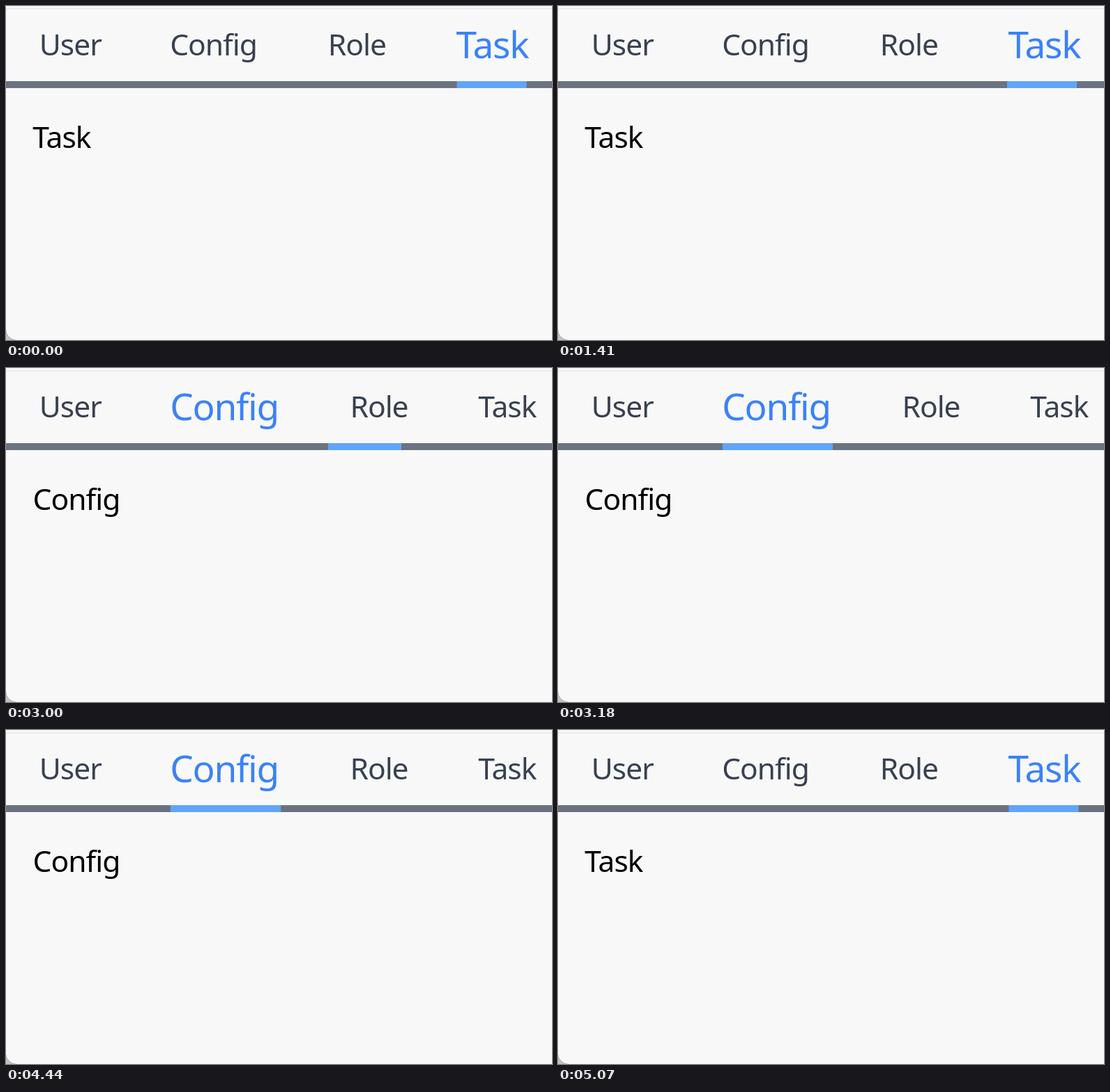
Recreate the animation shown at these times as an HTML page. Size 783 by 480 pixels, loop 5760 ms.

```html
<!DOCTYPE html>
<html lang="en">
<head>
<meta charset="utf-8">
<title>Tabs</title>
<style>
  html, body { margin: 0; width: 100%; height: 100%; overflow: hidden; background: #f8f8f8; }
  svg { display: block; width: 783px; height: 480px; }
  text { font: 42.5px "Noto Sans", "Open Sans", sans-serif; letter-spacing: -0.023em; }
  .tab { fill: #374151; }
  .tab.active { fill: #3b82f6; font-size: 53.1px; }
  .blank .tab { fill: #fffafd; stroke: #fffafd; stroke-width: 2px; }
  .blank #marker { visibility: hidden; }
</style>
</head>
<body>
<svg id="stage" viewBox="0 0 783 480">
  <rect width="783" height="480" fill="#c4c4c4"/>
  <rect x="-0.5" y="-40" width="830" height="520.5" rx="16" fill="#f8f8f8" stroke="#a4a4a4"/>
  <path d="M0 0V450" stroke="#f8f8f8" stroke-width="2"/>
  <path d="M20 480H783" stroke="#f8f8f8" stroke-width="2"/>
  <rect y="3.5" width="783" height="1.2" fill="#e3e3e3"/>
  <g id="tabs"></g>
  <rect y="108" width="783" height="10" fill="#6b7280"/>
  <rect id="marker" y="108" height="10" fill="#60a5fa"/>
  <text id="content" y="204"></text>
</svg>
<script>
const LOOP = 5760, STEP = 30, DURATION = 150;
const START = 49.3, GAP = 100, GROWTH = 1.25;

// width: advance at normal size; dx: side-bearing correction
const tabs = [
  { name: "User", width: 86.6, dx: -1.6 },
  { name: "Config", width: 126.6, dx: -0.7 },
  { name: "Role", width: 84, dx: -0.7 },
  { name: "Task", width: 80, dx: -1 }
];
const [USER, CONFIG, ROLE, TASK] = tabs.keys();

// lead: how far the marker's transition is along at the first repaint
const selections = [
  { at: 0, tab: TASK, lead: DURATION },
  { at: 1020, tab: USER, lead: DURATION, blank: true },
  { at: 1290, tab: TASK, lead: 17 },
  { at: 2190, tab: ROLE, lead: 17 },
  { at: 3000, tab: CONFIG, lead: 5 },
  { at: 3570, tab: USER, lead: 17 },
  { at: 4260, tab: CONFIG, lead: 5 },
  { at: 4590, tab: ROLE, lead: 17 },
  { at: 4950, tab: TASK, lead: 30 }
];

const byId = id => document.getElementById(id);
const stage = byId("stage"), marker = byId("marker"), content = byId("content");

const labels = tabs.map(({ name }) => {
  const label = document.createElementNS("http://www.w3.org/2000/svg", "text");
  label.textContent = name;
  byId("tabs").append(label);
  return label;
});

function layout(active) {
  let x = START;
  return tabs.map((tab, i) => {
    const box = { x, width: tab.width * (i === active ? GROWTH : 1) };
    x += box.width + GAP;
    return box;
  });
}

// cubic-bezier(0.4, 0, 0.2, 1)
function ease(p) {
  if (p <= 0 || p >= 1) return Math.min(1, Math.max(0, p));
  const curve = (a, b, u) => 3 * a * u * (1 - u) ** 2 + 3 * b * u * u * (1 - u) + u ** 3;
  let low = 0, high = 1;
  for (let i = 0; i < 20; i++) {
    const mid = (low + high) / 2;
    if (curve(0.4, 0.2, mid) < p) low = mid; else high = mid;
  }
  return curve(0, 1, low);
}

const mix = (a, b, p) => a + (b - a) * p;

function draw(time) {
  const t = Math.floor((time % LOOP) / STEP) * STEP;
  const index = selections.findLastIndex(s => s.at <= t);
  const now = selections[index];
  const before = selections[Math.max(0, index - 1)];
  const enlarged = now.blank ? before.tab : now.tab;

  layout(enlarged).forEach((box, i) => {
    const active = i === enlarged;
    labels[i].setAttribute("class", active ? "tab active" : "tab");
    labels[i].setAttribute("x", box.x + tabs[i].dx);
    labels[i].setAttribute("y", active ? 75 : 71);
  });

  const from = layout(before.tab)[before.tab], to = layout(now.tab)[now.tab];
  const p = ease((t - now.at + now.lead) / DURATION);
  marker.setAttribute("x", mix(from.x, to.x, p));
  marker.setAttribute("width", mix(from.width, to.width, p));

  content.textContent = tabs[now.tab].name;
  content.setAttribute("x", 39.3 + tabs[now.tab].dx);
  stage.classList.toggle("blank", Boolean(now.blank));
}

const began = performance.now();
function tick() {
  draw(performance.now() - began);
  requestAnimationFrame(tick);
}
tick();
</script>
</body>
</html>
```
